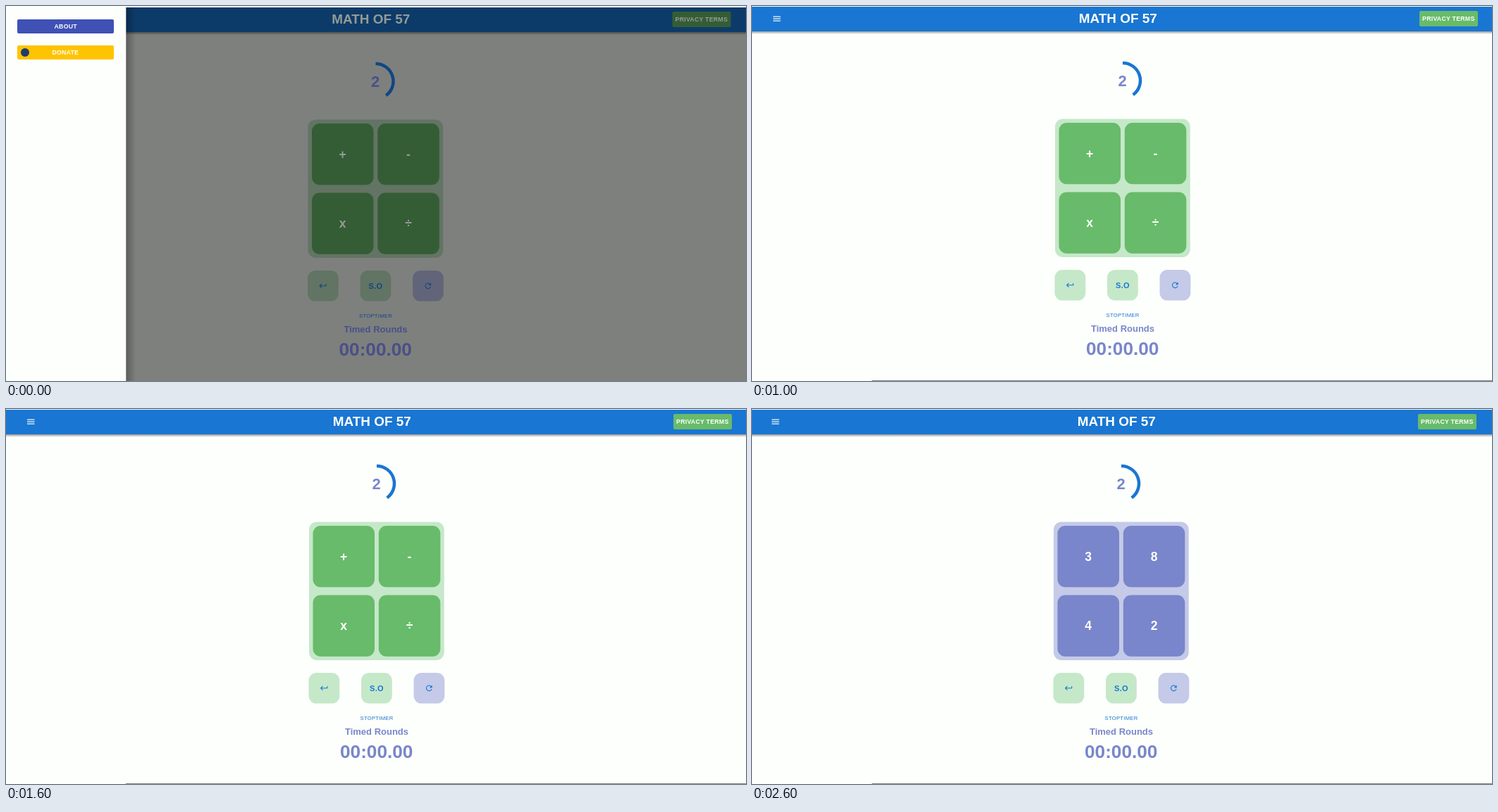
Recreate the animation shown at these times as an HTML page. Size 1050 px wide and 533 px high, loop 3 s.

```html
<!DOCTYPE html>
<html lang="en">
<head>
<meta charset="utf-8">
<title>Number game</title>
<style>
  html, body { margin: 0; width: 100%; height: 100%; overflow: hidden; background: #fdfffc; }
  svg { display: block; width: 1050px; height: 533px; }
  text { font-family: "Liberation Sans", Arial, sans-serif; font-weight: bold; text-anchor: middle; }
</style>
</head>
<body>
<svg id="stage" viewBox="0 0 1050 533">
  <defs>
    <linearGradient id="below" x2="0" y2="1">
      <stop stop-opacity=".4"/><stop offset="1" stop-opacity="0"/>
    </linearGradient>
    <linearGradient id="beside">
      <stop stop-opacity=".28"/><stop offset="1" stop-opacity="0"/>
    </linearGradient>
  </defs>
  <g id="scene"></g>
</svg>
<script>
const light = {
  page: '#fdfffc', blue: '#1976d2', accent: '#1976d2', white: '#fdfffc', indigo: '#7986cb',
  green: '#68bb6a', paleGreen: '#c5e8c9', paleIndigo: '#c4cae7'
};
// Colours of the page behind the drawer's backdrop
const dim = {
  page: '#7e807e', blue: '#0d3b69', accent: '#114783', white: '#949b97', indigo: '#4a5086',
  green: '#345d35', paleGreen: '#627464', paleIndigo: '#626579'
};

const returnIcon = 'M19 7v4H5.83l3.58-3.59L8 6l-6 6 6 6 1.41-1.41L5.83 13H21V7z';
const refreshIcon = 'M17.65 6.35C16.2 4.9 14.21 4 12 4c-4.42 0-7.99 3.58-7.99 8s3.57 8 7.99 8' +
  'c3.73 0 6.84-2.55 7.73-6h-2.08c-.82 2.33-3.04 4-5.65 4-3.31 0-6-2.69-6-6s2.69-6 6-6' +
  'c1.66 0 3.14.69 4.22 1.78L13 11h7V4l-2.35 2.35z';

const rect = (x, y, w, h, fill, r = 0) =>
  `<rect x="${x}" y="${y}" width="${w}" height="${h}" rx="${r}" fill="${fill}"/>`;
const text = (label, x, y, size, fill, extra = '') =>
  `<text x="${x}" y="${y}" font-size="${size}" fill="${fill}" ${extra}>${label}</text>`;
const icon = (path, x, y, fill) =>
  `<path transform="translate(${x} ${y}) scale(.55) translate(-12 -12)" d="${path}" fill="${fill}"/>`;
const spaced = 'letter-spacing=".25"';

function header(c, dx) {
  const bars = [14.5, 17.5, 20.5].map(y => rect(30 + dx, y, 10.5, 1.2, c.white)).join('');
  return rect(0, 36, 1050, 4, 'url(#below)') + rect(0, 1, 1050, 35, c.blue) + bars +
    text('MATH OF 57', 519.3 + dx, 24, 18.9, c.white) +
    rect(947 + dx, 7, 83, 22, c.green, 2) +
    text('PRIVACY TERMS', 988.3 + dx, 21, 8.75, c.white, spaced);
}

function board(c, symbols, panel, cell) {
  const cells = [...symbols].map((symbol, i) => {
    const x = 435.5 + (i % 2) * 93.3, y = 166 + (i >> 1) * 98.5;
    return rect(x, y, 87.5, 87.3, cell, 11) + text(symbol, x + 43.7, y + 49.8, 17.5, c.white);
  }).join('');
  return rect(430, 160.5, 191.7, 196.5, panel, 11) + cells;
}

function game(c, symbols, panel, cell) {
  return `<path d="M526 81a25 25 0 0 1 14.7 45.2" fill="none" stroke="${c.accent}" stroke-width="4.5"/>` +
    text('2', 525.7, 113.7, 22, c.indigo) +
    board(c, symbols, panel, cell) +
    rect(429.5, 375, 43.8, 43.6, c.paleGreen, 11) + icon(returnIcon, 451.3, 396.8, c.accent) +
    rect(504, 375, 43.8, 43.6, c.paleGreen, 11) + text('S.O', 526, 400.8, 11, c.accent, 'letter-spacing=".3"') +
    rect(578.5, 375, 43.8, 43.6, c.paleIndigo, 11) + icon(refreshIcon, 600.3, 396.8, c.accent) +
    text('STOPTIMER', 526, 442.3, 7.6, c.accent, 'letter-spacing=".3" style="font-weight:normal"') +
    text('Timed Rounds', 526, 463, 13, c.indigo) +
    text('00:00.00', 525.7, 496, 26.2, c.indigo);
}

function drawer() {
  return rect(170, 2, 14, 531, 'url(#beside)') + rect(0, 0, 170.3, 533, light.page) +
    rect(16, 19, 137, 20, '#3f51b5', 2) + text('ABOUT', 84.7, 31.7, 8.75, light.white, spaced) +
    rect(16, 56, 137, 20, '#ffc400', 2) + text('DONATE', 84.3, 69, 8.75, light.white, spaced) +
    '<circle cx="27" cy="66" r="6" fill="#1f3b70"/>';
}

function scene({ colors: c, dx, dy, numbers, open }) {
  const play = numbers ? game(c, '3842', c.paleIndigo, c.indigo) : game(c, '+-x÷', c.paleGreen, c.green);
  return rect(0, 1 + dy, 1050, 532, c.page) +
    `<g transform="translate(0 ${dy})">${header(c, dx)}<g transform="translate(${dx})">${play}</g></g>` +
    (open ? drawer() : rect(170, 532, 880, 1, dim.page));
}

const scenes = [
  { colors: dim, dx: -1.5, dy: 1, open: true },
  { colors: light, dx: 0, dy: 0 },
  { colors: light, dx: -2, dy: 0, numbers: true }
].map(scene);

const root = document.getElementById('scene');
let shown = -1;
function tick() {
  const index = Math.floor(performance.now() / 1000) % scenes.length;
  if (index !== shown) root.innerHTML = scenes[shown = index];
  requestAnimationFrame(tick);
}
tick();
</script>
</body>
</html>
```
